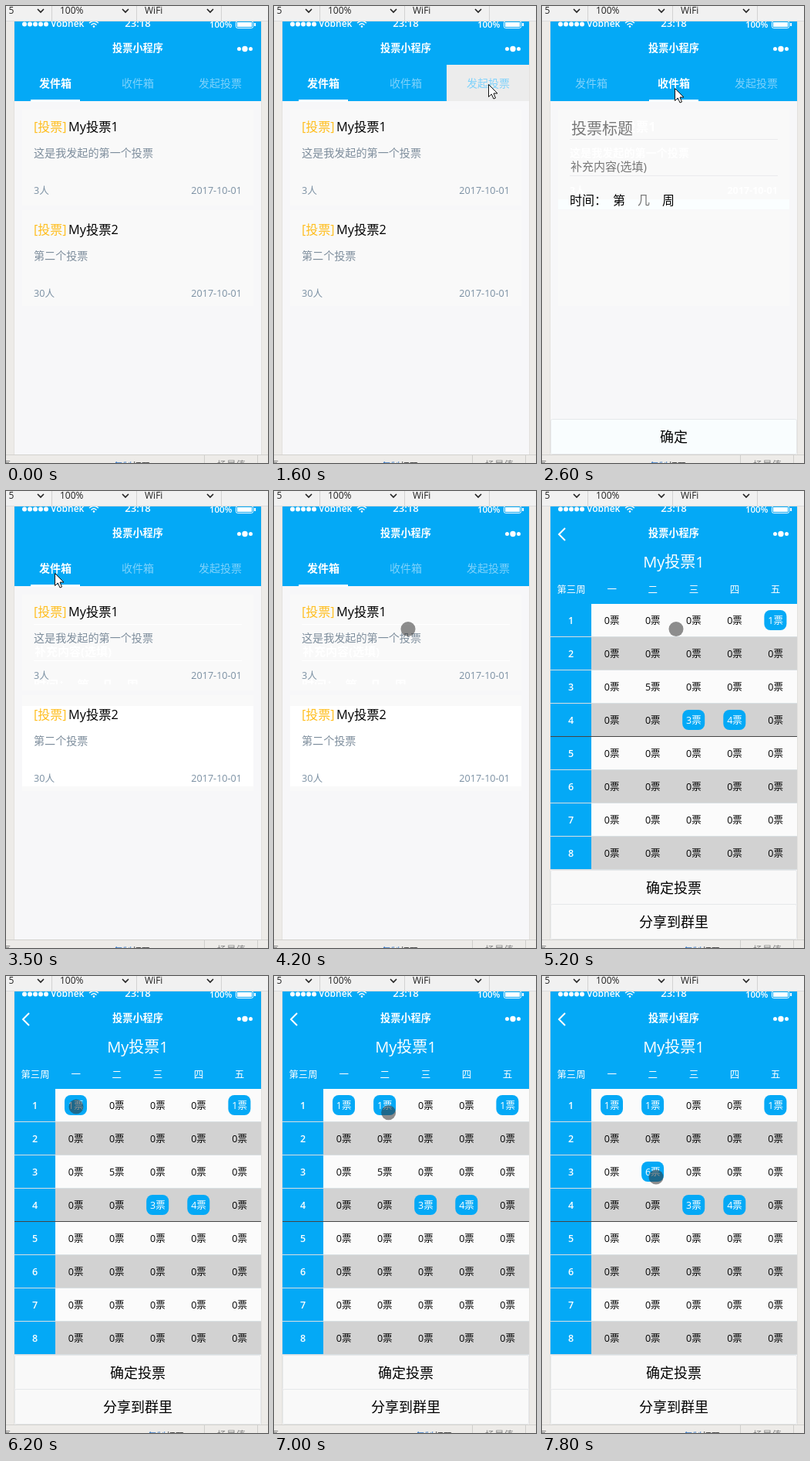
An HTML page that plays this animation: 340 by 591 pixels, repeating every 8000 ms.

```html
<!DOCTYPE html>
<html lang="zh-CN">
<head>
<meta charset="utf-8">
<style>
html, body { margin: 0; width: 100%; height: 100%; overflow: hidden; background: #edebe8; }
svg { display: block; width: 340px; height: 591px; }
text { font-family: "Open Sans", "Noto Sans CJK SC", "Noto Sans CJK", sans-serif; white-space: pre; }
.pale text { fill: #fff; font-weight: 700; }
.pale line { stroke: #fff; }
</style>
</head>
<body>
<svg id="stage" viewBox="0 0 340 591" xmlns="http://www.w3.org/2000/svg"></svg>
<script>
const BLUE = '#04a9f6', PAGE = '#f7f7f9', LOOP = 8000;
const ANCHORS = { l: 'start', m: 'middle', r: 'end' };

// Text is placed by its vertical centre.
const label = (x, cy, size, str, fill = '#000', anchor = 'l', weight = 400) =>
  `<text x="${x}" y="${cy + size * 0.37}" font-size="${size}" fill="${fill}" text-anchor="${ANCHORS[anchor]}" font-weight="${weight}">${str}</text>`;
const box = (x, y, w, h, fill, extra = '') =>
  `<rect x="${x}" y="${y}" width="${w}" height="${h}" fill="${fill}" ${extra}/>`;
const line = (x1, y1, x2, y2, stroke) =>
  `<line x1="${x1}" y1="${y1}" x2="${x2}" y2="${y2}" stroke="${stroke}"/>`;
const dot = (x, y, r) => `<circle cx="${x}" cy="${y}" r="${r}" fill="#fff"/>`;
const group = (id, body, extra = '') => `<g id="${id}" ${extra}>${body}</g>`;
const repeat = (n, fn) => Array.from({ length: n }, (_, i) => fn(i)).join('');

const item = (top, title, desc, people) =>
  label(36, top + 23, 16, '[投票]', '#ffbe1f') + label(81, top + 23, 16.3, title) +
  label(36, top + 56.5, 14.1, desc, '#7d8d9c') +
  label(36, top + 105, 12.6, people, '#7b90a3') +
  label(306, top + 105, 12.6, '2017-10-01', '#7b90a3', 'r');

const fields =
  label(38, 159, 20, '投票标题', '#777') + line(36, 172.5, 306, 172.5, '#ebebed') +
  label(37, 207, 15, '补充内容(选填)', '#777') + line(36, 219.5, 306, 219.5, '#ebebed') +
  label(36, 251, 16, '时间：') + label(92, 251, 16, '第') +
  label(124, 251, 16, '几', '#777') + label(156, 251, 16, '周');

const button = (y, str, fill) =>
  box(11.5, y + 0.5, 319, 45, fill, 'stroke="#e6e8ea" rx="2"') + label(171, y + 23, 18, str, '#000', 'm');

const TABS = ['发件箱', '收件箱', '发起投票'];
const tabX = i => 64 + i * 107;
const tabs = box(11, 76, 320, 47, BLUE) + TABS.map((name, i) =>
  group('press' + i, box(11 + i * 106.5, 76, 107, 47, '#ececec')) +
  group('tab' + i, label(tabX(i), 100, 14, name, '#7fd2fb', 'm')) +
  group('active' + i, label(tabX(i), 100, 14, name, '#fff', 'm', 700) +
    box(tabX(i) - 32, 121, 64, 3, '#fff'))).join('');

const colX = c => 90.7 + c * 53.1;
const rowY = r => 167 + r * 43;
const counts = { '0,4': 1, '2,1': 5, '3,2': 3, '3,3': 4 };
const badge = (r, c, n) =>
  box(colX(c) - 14.7, rowY(r) - 13, 29, 26, BLUE, 'rx="8"') +
  label(colX(c), rowY(r), 12.5, n + '票', '#fff', 'm');
const cell = (r, c) => {
  const n = counts[[r, c]] || 0;
  return n && n !== 5 ? badge(r, c, n) : label(colX(c), rowY(r), 12.5, n + '票', '#000', 'm');
};
const row = r => {
  const top = 146 + r * 43;
  return box(64, top, 267, 43, r % 2 ? '#d2d2d2' : '#fbfbfb') +
    label(37.5, rowY(r), 12.5, r + 1, '#fff', 'm', 600) + repeat(5, c => cell(r, c)) +
    line(11, top + 42.5, 331, top + 42.5, r === 3 ? '#444' : '#d9dfe2');
};
const votes = [[0, 0, 1, 6200], [0, 1, 1, 6800], [2, 1, 6, 7800]];

const table =
  group('grid', box(11, 76, 320, 414, BLUE) + repeat(8, row) +
    votes.map(([r, c, n], i) => group('vote' + i,
      box(colX(c) - 16, rowY(r) - 14, 32, 28, '#fbfbfb') + badge(r, c, n))).join('') +
    button(490, '确定投票', '#f9f9f9')) +
  button(534, '分享到群里', '#f9f9f9');

const caption = label(171, 92, 20, 'My投票1', '#fff', 'm') +
  label(38, 127, 12.3, '第三周', '#fff', 'm') +
  [...'一二三四五'].map((d, c) => label(colX(c), 127, 12.5, d, '#fff', 'm')).join('');

const header = box(11, 18, 320, 58, BLUE) +
  repeat(5, i => dot(24 + i * 7, 23.5, 3)) + label(58, 22.5, 12, 'Vobnek', '#fff', 'l', 600) +
  '<g fill="none" stroke="#fff" stroke-width="1.5"><path d="M108 22Q114 17 120 22M110.500 24.500Q114 21 117.500 24.500"/></g>' +
  dot(114, 26.5, 1.3) + label(171, 22.5, 13.2, '23:18', '#fff', 'm', 600) +
  label(293.5, 24, 11.5, '100%', '#fff', 'r', 600) +
  box(298.5, 19.5, 22, 9, 'none', 'stroke="#fff" rx="2"') + box(300, 21, 19, 6, '#fff') + box(322, 22, 2, 4, '#fff') +
  label(171, 54.5, 13.2, '投票小程序', '#fff', 'm', 600) +
  dot(302.5, 55.5, 2.5) + dot(310, 55.5, 3.7) + dot(317.5, 55.5, 2.5) +
  group('back', '<path d="M30 48L22 56L30 64" fill="none" stroke="#fff" stroke-width="2"/>');

const menu = (x, str) => label(x, 6, 12, str, '#222');
const frame = box(0, 18, 11, 563, '#edebe8') + box(331, 18, 9, 563, '#edebe8') +
  line(10.5, 20, 10.5, 580, '#e3e1de') + line(331.5, 20, 331.5, 580, '#e3e1de') +
  box(0, 0, 340, 19.5, '#f1f1f1') + line(0, 19.5, 340, 19.5, '#dcdcdc') +
  menu(3.5, '5') + menu(70, '100%') + menu(180, 'WiFi') +
  [45, 155, 265].map(x => line(x + 14.5, 0, x + 14.5, 19, '#d2d2d2') +
    `<path d="M${x - 4} 4l4 4l4-4" fill="none" stroke="#222" stroke-width="1.600"/>`).join('') +
  box(0, 580, 340, 11, '#edebe8') + line(0, 580.5, 340, 580.5, '#d2d1ce') +
  line(257.5, 581, 257.5, 591, '#cfcecb') + line(326.5, 581, 326.5, 591, '#cfcecb') +
  label(-6, 594, 12, '页', '#777') + label(274, 593, 12.3, '场景值', '#888') +
  group('path', label(58, 595, 11.5, 'pages/index', '#222')) +
  group('links', label(140, 594.5, 11.5, '复制', '#2a6fc0') + label(164, 594.5, 11.5, '打开', '#444'));

document.getElementById('stage').innerHTML =
  box(0, 0, 340, 591, '#edebe8') + box(11, 20, 320, 560, PAGE) +
  group('cards', box(21, 134, 300, 124, '#f9f9f9') + box(21, 264, 300, 124, '#f9f9f9')) +
  group('band', box(21, 250, 300, 13, '#fafeff')) +
  group('bright', box(21, 278, 300, 104, '#fff')) +
  group('haze', `<svg x="11" y="171" width="320" height="79" viewBox="11 171 320 79" style="width:320px;height:79px">${fields}</svg>`, 'class="pale"') +
  group('first', item(133, 'My投票1', '这是我发起的第一个投票', '3人')) +
  group('second', item(266, 'My投票2', '第二个投票', '30人')) +
  group('form', fields + button(534, '确定', '#f9fdfe')) +
  group('tabs', tabs) + group('table', table) + header + group('caption', caption) + frame +
  group('cursor', '<path d="M.5.5V16.500L4.300 13L7 19L9.500 18L7 12H12Z" fill="#fff" stroke="#111"/>') +
  group('touch', '<circle r="9.500" fill="#333" fill-opacity=".55"/>');

const el = {};
document.querySelectorAll('g[id]').forEach(g => el[g.id] = g);
const show = (id, on) => el[id].style.display = on ? '' : 'none';
const move = (id, x, y) => el[id].setAttribute('transform', `translate(${x} ${y})`);

// Each step is [time, x, y]; straight runs between steps.
const cursorPath = [[400, 93, 49], [800, 205, 72], [1200, 284, 98], [1500, 278, 101], [1900, 278, 101],
  [2400, 172, 106], [3000, 172, 106], [3300, 63, 106]];
const touchPath = [[4100, 140, 155], [4200, 174, 178.5], [5600, 174, 178.5], [5900, 91, 169], [6200, 91, 169],
  [6500, 146.5, 169], [6900, 146.5, 167], [7300, 155, 206], [7600, 148, 260]];
function follow(path, t) {
  const next = path.findIndex(p => p[0] > t);
  if (next < 0) return path[path.length - 1].slice(1);
  if (next === 0) return path[0].slice(1);
  const a = path[next - 1], b = path[next], k = (t - a[0]) / (b[0] - a[0]);
  return [a[1] + (b[1] - a[1]) * k, a[2] + (b[2] - a[2]) * k];
}

function draw(now) {
  const t = Math.floor(now % LOOP / 100) * 100;
  const within = (from, to) => t >= from && t < to;
  const detail = t >= 4800, creating = within(1700, 2800);
  const active = within(1700, 2600) ? 2 : within(2600, 3500) ? 1 : 0;
  const pressed = within(1500, 1700) ? 2 : within(2400, 2600) ? 1 : within(3300, 3500) ? 0 : -1;

  TABS.forEach((_, i) => {
    show('press' + i, pressed === i);
    show('tab' + i, active !== i);
    show('active' + i, active === i);
  });
  show('tabs', !detail);
  show('cards', !detail);
  show('band', creating);
  show('bright', within(2800, 4800));
  show('haze', within(2800, 4800));
  show('first', !detail);
  el.first.setAttribute('class', creating ? 'pale' : '');
  show('second', !detail && !creating);
  show('form', creating || within(4800, 5200));

  show('back', detail);
  show('table', t >= 5000);
  show('caption', t >= 5200);
  move('table', t < 5100 ? 267 : t < 5200 ? 80 : 0, 0);
  move('grid', 0, t < 5200 ? -26 : 0);
  votes.forEach((v, i) => show('vote' + i, t >= v[3]));
  show('path', !detail);
  move('links', detail ? 44 : 0, 0);

  show('cursor', within(400, 4100));
  show('touch', t >= 4100);
  move('cursor', ...follow(cursorPath, t));
  move('touch', ...follow(touchPath, t));
}

const start = performance.now();
(function tick() {
  draw(performance.now() - start);
  requestAnimationFrame(tick);
})();
</script>
</body>
</html>
```
